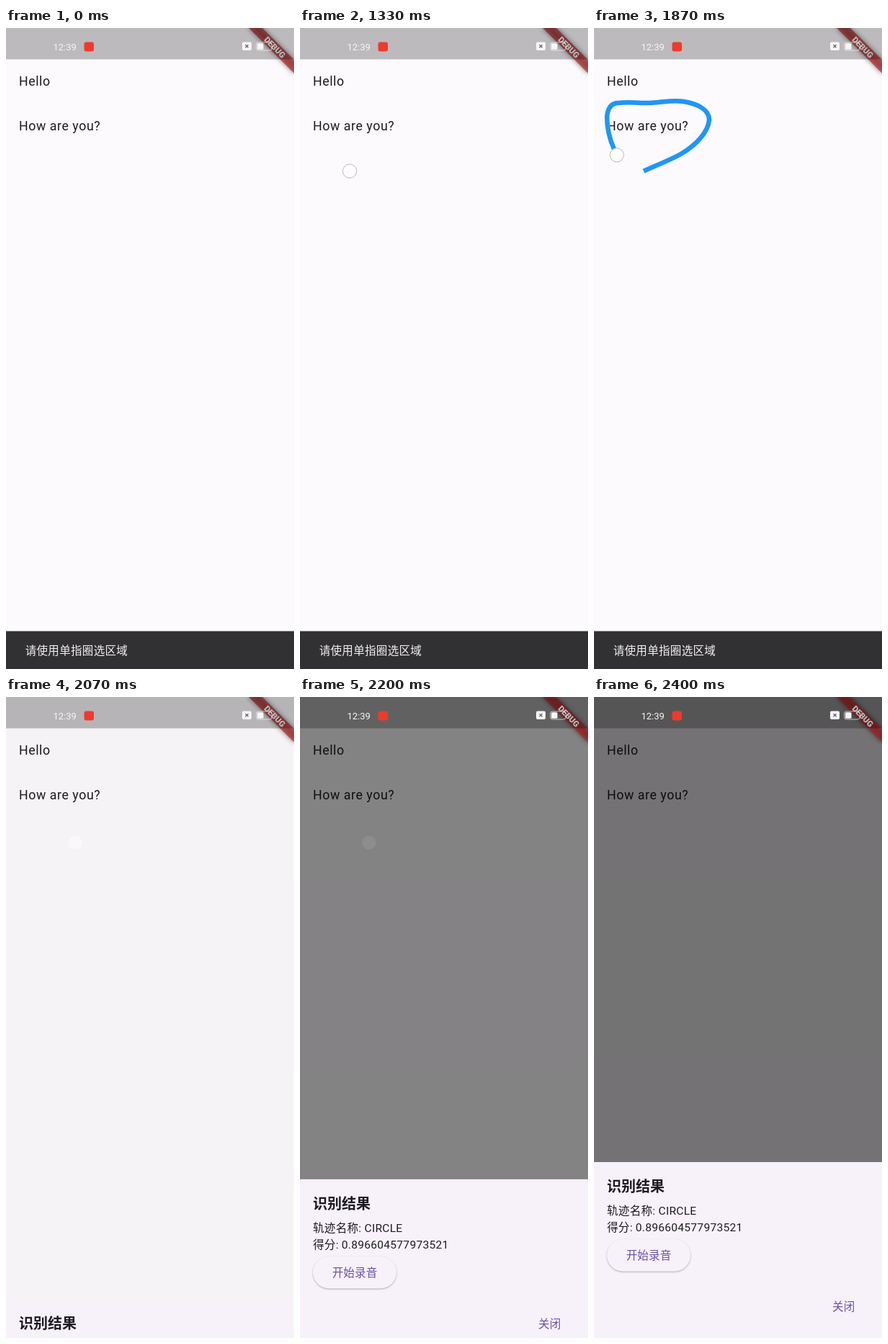
An HTML page that plays this animation: 400x889 px, repeating every 3.14 s.

```html
<!DOCTYPE html>
<html lang="zh-CN">
<head>
<meta charset="utf-8">
<style>
  html, body { margin: 0; width: 100%; height: 100%; overflow: hidden; }
  svg { display: block; width: 100%; height: 100%; }
  text { font: 15.56px Roboto, "Noto Sans CJK SC", "Noto Sans CJK", sans-serif; letter-spacing: .28px; fill: #1c1b1f; }
  .body { font-size: 17.78px; letter-spacing: .556px; }
  .title { font-size: 20px; font-weight: 700; letter-spacing: 0; }
  .action { font-weight: 500; letter-spacing: .11px; fill: #6750a4; }
  .light { fill: #f4eff4; }
  .clock { font-size: 13px; letter-spacing: 0; fill: #f6f6f6; }
  .debug { font-size: 11.33px; font-weight: 900; letter-spacing: 0; text-anchor: middle; fill: #fff; }
  .blur { filter: blur(3.5px); }
  .pill { filter: drop-shadow(0 1px 1px rgba(0, 0, 0, .3)); }
</style>
</head>
<body>
<svg viewBox="0 0 400 889" preserveAspectRatio="none">
  <rect width="400" height="889" fill="#fdfafd"/>
  <text class="body" x="18" y="80">Hello</text>
  <text class="body" x="18" y="142">How are you?</text>

  <rect y="836.5" width="400" height="53" fill="#313033"/>
  <text class="light" x="26.7" y="868.8">请使用单指圈选区域</text>

  <path id="trail" fill="none" stroke="#2196f3" stroke-width="6.5" stroke-linejoin="round"
    d="M69 198.500C86 190 105 184 122 174C142 162 159 144 160 127C160 113 143 105 125 102C106 99 88 105 66 104C54 103 42 103 32 104C23 105 19 113 18 123C18 140 22 155 28 168C31 176 38 190 54 197C67 203 82 203 96 202"/>

  <rect id="scrim" width="400" height="889"/>
  <g id="sheet">
    <rect width="400" height="245" fill="#f7f2fa"/>
    <text class="title" x="18" y="41">识别结果</text>
    <text x="18" y="73">轨迹名称: CIRCLE</text>
    <text x="18" y="96.300">得分: 0.896604577973521</text>
    <rect class="pill" x="18" y="107" width="116" height="44.400" rx="22.200" fill="#f7f2fa"/>
    <text class="action" x="44.700" y="135">开始录音</text>
    <text class="action" x="331" y="206">关闭</text>
  </g>

  <g transform="translate(400 0) rotate(45)">
    <rect class="blur" x="-44.400" y="31.100" width="88.800" height="13.300" fill-opacity=".5"/>
    <rect x="-44.400" y="31.100" width="88.800" height="13.300" fill="#b71c1c" fill-opacity=".63"/>
    <text class="debug" y="41.800">DEBUG</text>
  </g>

  <rect width="400" height="43.500" fill-opacity=".26"/>
  <text class="clock" x="65.500" y="30.500">12:39</text>
  <rect x="108.500" y="19.500" width="13.500" height="13" rx="3" fill="#ee3a2c"/>
  <rect x="328" y="19.500" width="13" height="11.500" rx="2" fill="#f6f6f6"/>
  <path d="M332.500 23.200l4 4m0-4l-4 4" stroke="#66646a" stroke-width="1.300"/>
  <rect x="347.700" y="20" width="21.500" height="11" rx="3" fill="none" stroke="#f6f6f6" stroke-opacity=".7"/>
  <rect x="349" y="21.300" width="8.500" height="8.400" rx="1.500" fill="#f6f6f6"/>

  <circle id="finger" r="9.600" fill="#fff"/>
</svg>
<script>
const LOOP = 3140, STEP = 1000 / 15, LAST = 36;
const PRESS = 20 * STEP, LIFT = 30 * STEP, OPEN_AT = 2050, OPEN_MS = 250, SHEET_H = 244;
const $ = id => document.getElementById(id);
const set = (el, attrs) => { for (const k in attrs) el.setAttribute(k, attrs[k]); };
const [trail, scrim, sheet, finger] = ['trail', 'scrim', 'sheet', 'finger'].map($);
const total = trail.getTotalLength();

// distance of the finger along the path, one entry per step
const drag = [0, 18, 62, 108, 160, 212, 262, 306, 342, 379, total];

function bezier(x1, y1, x2, y2) {
  const at = (a, b, s) => 3 * (1 - s) ** 2 * s * a + 3 * (1 - s) * s * s * b + s ** 3;
  return x => {
    let lo = 0, hi = 1;
    for (let i = 0; i < 24; i++) {
      const s = (lo + hi) / 2;
      if (at(x1, x2, s) < x) lo = s; else hi = s;
    }
    return at(y1, y2, lo);
  };
}
const ease = bezier(.25, .1, .25, 1);
const decelerate = bezier(0, 0, .2, 1);

// screen updates run at 15 per second, shown on 10 ms marks
function stepAt(now) {
  const n = Math.floor((now + 5) / STEP);
  return Math.min(LAST, Math.round(n * STEP / 10) * 10 > now ? n - 1 : n);
}

function draw(now) {
  const n = stepAt(now), t = n * STEP;
  const i = n - Math.round(PRESS / STEP);
  const dragging = i >= 0 && i < drag.length;
  const reach = dragging ? drag[i] : total;
  const drawn = reach === total ? total : Math.max(0, reach - 10);
  const at = trail.getPointAtLength(reach);
  set(trail, {
    'stroke-dasharray': `${drawn} 999`,
    visibility: dragging && drawn > 0 ? 'visible' : 'hidden'
  });
  set(finger, {
    cx: at.x, cy: at.y,
    opacity: dragging ? 1 : t > LIFT ? Math.max(0, (2229 - t) / 350) : 0,
    stroke: dragging ? '#b2b6bc' : 'none'
  });

  const p = Math.min(1, Math.max(0, (t - OPEN_AT) / OPEN_MS));
  set(scrim, { 'fill-opacity': .54 * ease(p) });
  set(sheet, {
    transform: `translate(0 ${889 - SHEET_H * decelerate(p)})`,
    visibility: p > 0 ? 'visible' : 'hidden'
  });
}

const start = performance.now();
function loop() {
  draw((performance.now() - start) % LOOP);
  requestAnimationFrame(loop);
}
loop();
</script>
</body>
</html>
```
